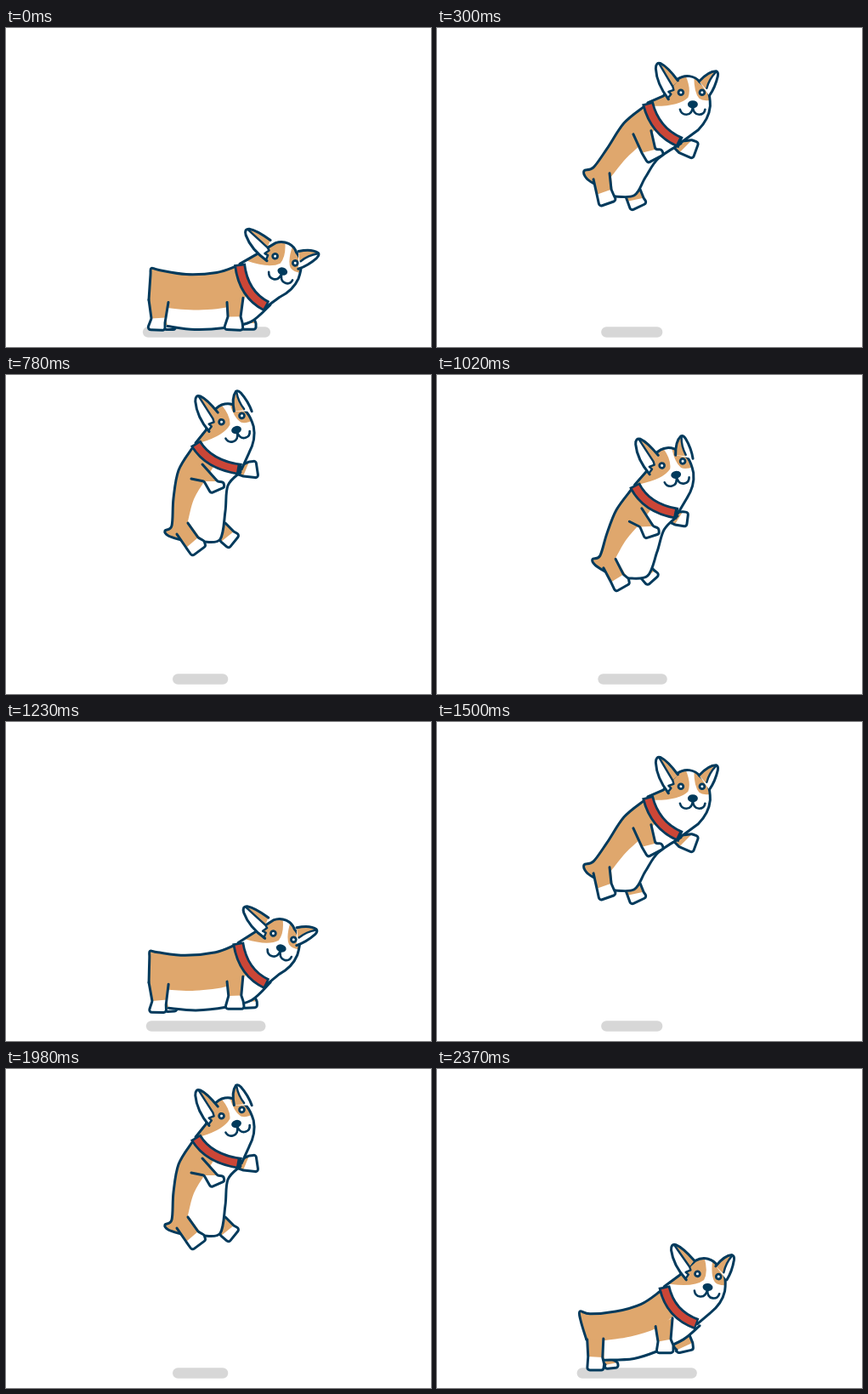
Recreate the animation shown at these times as an HTML page with a canvas. Size 500x375 px, loop 2.4 s.

```html
<!DOCTYPE html>
<html lang="en">
<head>
<meta charset="utf-8">
<title>Jumping corgi</title>
<style>
html, body { margin: 0; width: 100%; height: 100%; overflow: hidden; background: #fff; }
canvas { display: block; }
</style>
</head>
<body>
<canvas id="stage" width="500" height="375"></canvas>
<script>
const ctx = document.getElementById('stage').getContext('2d');
const NAVY = '#003a5c', TAN = '#dfa76d', WHITE = '#fff', RED = '#cb4637', SHADOW = '#d7d7d7';
const PERIOD = 1200;

// Parts: back / near hind leg / far hind leg / near front leg / far front leg /
// belly / coat edge / collar / head centre / head and ear angles, shadow shrink
const parse = text => text.split('/').map(part =>
  part.trim().split(/\s+/).map(point => point.split(',').map(Number)));

const stand = parse(`270,281 248,288 212,290 180,285 171,283 170,291 168,320 /
  168,320 171,342 166,355 187,356 187,347 188,341 191,323 /
  184,345 186,350 184,355 200,355 199,348 191,342 /
  260,323 261,340 256,355 279,356 278,347 276,340 279,318 /
  276,340 277,347 277,355 294,355 294,348 291,340 /
  190,351 222,355 257,353 288,346 311,326 /
  186,329 222,332 262,328 289,312 /
  275,278 279,314 307,328 / 328.5,273 / 19,-36 17,0`);

const leap = parse(`243,93 220,112 200,142 184,164 173,168 176,177 186,184 /
  184,178 188,196 191,210 211,203 208,197 205,190 203,171 /
  221,196 224,204 228,215 247,206 243,200 239,190 /
  231,125 241,147 248,159 267,149 264,143 257,143 252,121 /
  279,141 285,147 301,154 308,135 300,132 291,133 /
  207,198 232,197 245,176 260,154 287,136 /
  205,175 222,154 240,137 258,118 /
  248,88 256,122 287,135 / 299.5,76 / 0,0 0,.9`);

const upright = parse(`219,86 203,112 197,145 195,177 187,183 191,189 206,194 /
  201,187 212,203 219,213 235,201 233,195 226,191 214,174 /
  249,190 253,196 262,204 275,188 268,184 258,174 /
  218,122 233,125 241,139 257,132 256,126 249,125 231,105 /
  271,116 279,119 297,121 294,101 286,102 277,106 /
  232,196 252,193 258,160 261,130 276,114 /
  214,172 221,146 234,124 246,105 /
  223,80 238,106 277,111 / 265.5,51.5 / -17,15 -37,.98`);

const land = parse(`262,261 240,276 210,285 180,288 168,285 169,296 176,318 /
  177,318 178,338 177,354 196,354 197,347 195,339 196,317 /
  196,345 198,348 194,353 214,351 213,345 206,341 /
  257,302 260,320 258,333 278,333 278,324 275,317 277,292 /
  278,325 282,330 281,334 302,329 301,321 296,309 /
  197,342 232,340 262,330 290,317 309,301 /
  196,319 228,314 258,304 280,288 /
  267,255 274,288 306,299 / 318.5,241.5 / 7,-11 -12,.11`);

// Take-off is the standing pose, raised and tilted a little
const takeOff = stand.slice(0, -1).map(part => part.map(([x, y]) =>
  [x + (y - 320) * 0.043, y - 13 - (x - 170) * 0.043]));
takeOff.push([[17, -34], [19, 0.11]]);

const linear = s => s;
const KEYS = [
  { at: 0, pose: stand, ease: linear },
  { at: 30, pose: takeOff, ease: linear },
  { at: 300, pose: leap, ease: s => 1 - (1 - s) ** 1.7 },
  { at: 780, pose: upright, ease: s => s ** 3.2 },
  { at: 1170, pose: land, ease: linear },
  { at: PERIOD, pose: stand }
];

const mix = (a, b, k) => Array.isArray(a) ? a.map((v, i) => mix(v, b[i], k)) : a + (b - a) * k;

function lift(t) {
  const u = t / 600 - 1;
  return 190 * (1 - Math.abs(u) ** (u < 0 ? 3 : 4));
}

// Catmull-Rom curve appended to a path
function spline(path, pts) {
  path.lineTo(...pts[0]);
  for (let i = 0; i < pts.length - 1; i++) {
    const b = pts[i], c = pts[i + 1], a = pts[i - 1] || b, d = pts[i + 2] || c;
    path.bezierCurveTo(b[0] + (c[0] - a[0]) / 6, b[1] + (c[1] - a[1]) / 6,
      c[0] - (d[0] - b[0]) / 6, c[1] - (d[1] - b[1]) / 6, c[0], c[1]);
  }
  return path;
}

function fill(path, color) {
  ctx.fillStyle = color;
  ctx.fill(path);
}

function stroke(path, color = NAVY, width = 3) {
  ctx.strokeStyle = color;
  ctx.lineWidth = width;
  ctx.stroke(path);
}

function clipped(path, draw) {
  ctx.save();
  ctx.clip(path);
  draw();
  ctx.restore();
}

function drawLeg(pts) {
  const leg = new Path2D(), paw = new Path2D();
  leg.moveTo(...pts[0]);
  for (let i = 1; i < pts.length - 1; i++) leg.arcTo(...pts[i], ...pts[i + 1], 3);
  leg.lineTo(...pts[pts.length - 1]);
  pts.slice(1, -1).forEach(p => paw.lineTo(...p));
  fill(leg, TAN);
  clipped(leg, () => fill(paw, WHITE));
  stroke(leg);
}

function drawBody(back, belly, edge) {
  const body = spline(spline(new Path2D(), back), belly);
  const white = spline(spline(new Path2D(), edge), [...belly].reverse());
  fill(body, TAN);
  clipped(body, () => fill(white, WHITE));
  stroke(spline(new Path2D(), back));
  stroke(spline(new Path2D(), belly));
}

const shape = d => new Path2D(d);
const HEAD = {
  leftPatch: shape('M-60-40H-7V-20Q0-4-4 6Q-14 16-42 16L-60 16Z'),
  rightPatch: shape('M3-40V-18Q3 0 9 7Q15 12 30 7V-40Z'),
  mouth: shape('M-13.5 20Q-12 26-6 26Q1 26 1.5 16Q2 26 9 26Q15 26 16 20'),
  leftEar: {
    pivot: [-23, -3],
    outline: shape('M-16-14Q-28-30-36-34Q-42-36-42-28Q-41-10-27 8'),
    white: shape('M-16-14Q-28-30-36-34Q-42-36-42-28Q-41-10-27 8L-24 2L-27-1L-21-3L-22-8Z'),
    tan: shape('M-16-14Q-28-30-37-34Q-31-22-22-7Z'),
    lines: shape('M-38-34Q-31-22-22-7L-21-3L-27-1L-24 2L-28 7')
  },
  rightEar: {
    pivot: [15, -5],
    outline: shape('M9-13Q20-25 29-25Q32-24 31-19Q28-6 21 4'),
    white: shape('M9-13Q20-25 29-25Q32-24 31-19Q28-6 21 4Z'),
    tan: shape('M9-13Q20-25 30-25Q21-16 17-4Z'),
    lines: shape('M29-24Q21-16 18-5')
  }
};

function turn(degrees, [x, y] = [0, 0]) {
  ctx.translate(x, y);
  ctx.rotate(degrees * Math.PI / 180);
  ctx.translate(-x, -y);
}

function drawEar(ear, angle) {
  ctx.save();
  turn(angle, ear.pivot);
  fill(ear.white, WHITE);
  fill(ear.tan, TAN);
  stroke(ear.lines, NAVY, 2.4);
  stroke(ear.outline);
  ctx.restore();
}

function dot(x, y, rx, ry, color) {
  const path = new Path2D();
  path.ellipse(x, y, rx, ry, 0, 0, 7);
  fill(path, color);
}

function drawHead([cx, cy], angle, leftEar, rightEar, collar) {
  const a = angle * Math.PI / 180, cos = Math.cos(a), sin = Math.sin(a);
  const at = (x, y) => [cx + x * cos - y * sin, cy + x * sin + y * cos];
  const outline = new Path2D();
  outline.moveTo(...collar[0]);
  outline.lineTo(...at(-33, 4));
  outline.lineTo(...at(-17, -15));
  outline.bezierCurveTo(...at(-8, -22), ...at(4, -20), ...at(10, -12));
  outline.bezierCurveTo(...at(19, -6), ...at(22, 0), ...at(22, 16));
  outline.bezierCurveTo(...at(21, 27), ...at(15, 37), ...at(8, 44));
  outline.lineTo(...collar[2]);
  const face = new Path2D(outline);
  face.quadraticCurveTo(...collar[1], ...collar[0]);
  fill(face, WHITE);
  const place = () => { ctx.translate(cx, cy); turn(angle); };
  clipped(face, () => {
    place();
    fill(HEAD.leftPatch, TAN);
    fill(HEAD.rightPatch, TAN);
  });
  stroke(outline);
  ctx.save();
  place();
  drawEar(HEAD.leftEar, leftEar);
  drawEar(HEAD.rightEar, rightEar);
  for (const x of [-12.5, 12.5]) {
    dot(x, 0, 4.3, 4.3, NAVY);
    dot(x, 0, 1.5, 1.5, WHITE);
  }
  dot(1.5, 14, 6, 4.5, NAVY);
  stroke(HEAD.mouth, NAVY, 2.6);
  ctx.restore();
}

function drawCollar([start, control, end]) {
  const band = new Path2D();
  band.moveTo(...start);
  band.quadraticCurveTo(...control, ...end);
  ctx.save();
  ctx.lineCap = 'butt';
  stroke(band, NAVY, 14);
  ctx.setLineDash([57, 99]);
  ctx.lineDashOffset = -2.5;
  stroke(band, RED, 8.4);
  ctx.restore();
}

function drawShadow(shrink) {
  const path = new Path2D();
  path.moveTo(167 + 36 * shrink, 357.5);
  path.lineTo(305 - 51 * shrink, 357.5);
  stroke(path, SHADOW, 12.5);
}

function draw(t) {
  const i = KEYS.findIndex((key, n) => t < KEYS[n + 1].at);
  const from = KEYS[i], to = KEYS[i + 1];
  const k = from.ease((t - from.at) / (to.at - from.at));
  const [back, hind, farHind, front, farFront, belly, edge, collar, [centre],
    [[angle, leftEar], [rightEar, shrink]]] = mix(from.pose, to.pose, k);

  ctx.fillStyle = WHITE;
  ctx.fillRect(0, 0, 500, 375);
  ctx.lineCap = ctx.lineJoin = 'round';
  drawShadow(shrink);
  ctx.save();
  ctx.translate(0, mix(lift(from.at), lift(to.at), k) - lift(t));
  drawLeg(farHind);
  drawLeg(farFront);
  drawBody(back, belly, edge);
  drawLeg(hind);
  drawLeg(front);
  drawHead(centre, angle, leftEar, rightEar, collar);
  drawCollar(collar);
  ctx.restore();
}

const begin = performance.now();
function tick() {
  draw((performance.now() - begin) % PERIOD);
  requestAnimationFrame(tick);
}
tick();
</script>
</body>
</html>
```
